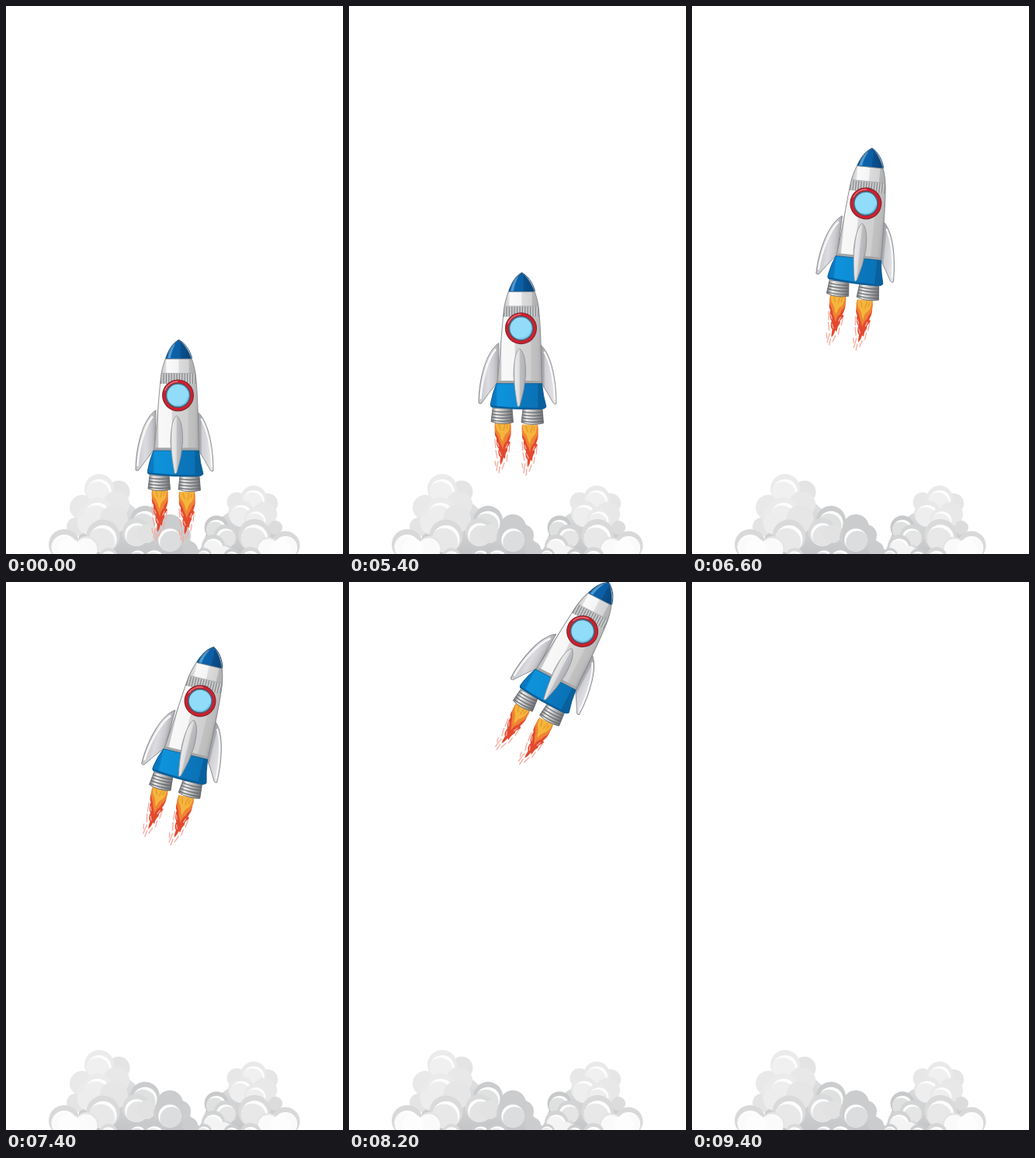
An HTML page with a canvas for the animation above (9600 ms loop, 434 px wide and 705 px high).

```html
<!DOCTYPE html>
<html lang="en">
<head>
<meta charset="utf-8">
<title>Rocket launch</title>
<style>
  html, body { margin: 0; width: 100%; height: 100%; overflow: hidden; background: #fff; }
  canvas { display: block; width: 434px; height: 705px; }
</style>
</head>
<body>
<canvas id="stage" width="434" height="705"></canvas>
<script>
const ctx = document.getElementById('stage').getContext('2d');
const LOOP = 9600, HOLD = 5000, STEP = 200;

// Window centre and tilt of the rocket: step, x, y, degrees
const PATH = [
  [0, 221.5, 501, 0], [1, 221.5, 476, 0], [4, 221.5, 384, 0],
  [5, 220, 358, 1.3], [9, 223.8, 254, 5.8], [13, 250, 153, 13.5],
  [17, 300.6, 63.5, 27.3], [18, 311.6, 33.4, 29], [19, 333.6, -3, 33],
  [20, 371, -44, 37], [21, 399.5, -75, 40], [22, 434.5, -114, 42]
];

function poseAt(step) {
  const i = Math.max(1, PATH.findIndex(p => p[0] >= step));
  const a = PATH[i - 1], b = PATH[i];
  const u = (step - a[0]) / (b[0] - a[0]);
  return [1, 2, 3].map(j => a[j] + (b[j] - a[j]) * u);
}

function shape(d, fill, line, width = 1) {
  const p = new Path2D(d);
  if (fill) { ctx.fillStyle = fill; ctx.fill(p); }
  if (line) { ctx.strokeStyle = line; ctx.lineWidth = width; ctx.stroke(p); }
}

function disc(x, y, r, fill, line, width = 1) {
  ctx.beginPath();
  ctx.arc(x, y, r, 0, Math.PI * 2);
  if (fill) { ctx.fillStyle = fill; ctx.fill(); }
  if (line) { ctx.strokeStyle = line; ctx.lineWidth = width; ctx.stroke(); }
}

function arc(x, y, r, from, to, color, width) {
  ctx.beginPath();
  ctx.arc(x, y, r, from, to);
  ctx.strokeStyle = color;
  ctx.lineWidth = width;
  ctx.stroke();
}

function across(x0, x1, ...stops) {
  const g = ctx.createLinearGradient(x0, 0, x1, 0);
  stops.forEach(([at, color]) => g.addColorStop(at, color));
  return g;
}

function clipped(d, draw) {
  ctx.save();
  ctx.clip(new Path2D(d));
  draw();
  ctx.restore();
}

// Smoke ball: rim on top, white crescent, body reaching the lower edge
function puff(x, y, r, rim, body, lean = 1) {
  disc(x, y, r, rim);
  ctx.save();
  ctx.beginPath();
  ctx.arc(x, y + r * 0.17, r * 0.82, 0, Math.PI * 2);
  ctx.clip();
  disc(x, y, r, '#fdfdfd');
  disc(x - lean * r * 0.13, y + r * 0.36, r * 0.84, body);
  ctx.restore();
}

function drawSmoke() {
  const shade = ctx.createLinearGradient(0, 630, 0, 705);
  shade.addColorStop(0, '#e3e4e4');
  shade.addColorStop(1, '#c3c5c7');
  shape('M100 650L150 632L168 648L196 664L222 672L244 694L252 705H90Z', shade);
  shape('M248 705L262 668L296 645L340 648L352 680L330 705Z', shade);

  // left bank
  disc(145, 625, 14.5, '#e4e4e4');
  disc(98, 645, 16, '#e9e9e9');
  disc(90, 670, 12, '#e4e4e4');
  puff(120, 621, 19, '#ebebeb', '#f0f0f0');
  disc(142, 641, 17, '#e8e8e8');
  disc(110, 659, 19, '#ebebeb');
  puff(118, 652, 20, '#ebebeb', '#eeeeee');
  disc(139, 660, 18, '#e6e6e6');
  disc(106, 666, 14, '#ededed');
  puff(179, 662, 19, '#cbccce', '#dfe0e0');
  puff(168, 677, 18, '#d9dadb', '#e4e4e4', -1);
  disc(181, 679, 12, '#e2e2e2');
  disc(203, 683, 13, '#cfd0d2');
  disc(224, 681, 14, '#cccdcf');
  disc(211, 671, 17, '#cbccce');
  puff(211, 684, 18, '#cbccce', '#dcddde', -1);
  disc(237, 699, 10, '#cbccce');
  puff(75, 693, 20, '#d9d9d9', '#fafafa');
  puff(125, 682, 21.5, '#dadada', '#e8e8e8');
  disc(104, 697, 15, '#e4e4e4');
  disc(103, 699, 14.5, '#fafafa');
  disc(82, 699, 14, '#fdfdfd');
  puff(132, 709, 12, '#dadada', '#f0f0f0');
  puff(170, 709, 13, '#c8c9cb', '#dadbdc');
  puff(191, 710, 15, '#c8c9cb', '#e7e7e7');

  // right bank
  disc(337, 640, 13, '#e5e5e5');
  disc(297, 638, 12.5, '#e7e7e7');
  puff(319, 634, 17, '#e9e9e9', '#f0f0f0');
  disc(333, 654, 16, '#e8e8e8');
  puff(303, 653, 17, '#e8e8e8', '#eeeeee');
  puff(322, 660, 15, '#e9e9e9', '#eeeeee');
  disc(347, 671, 9, '#dcdcdc');
  puff(271, 671, 15.5, '#c8c9cb', '#dfe0e0');
  puff(283, 682, 15, '#d3d4d5', '#e5e5e5', -1);
  puff(320, 681, 21, '#dadada', '#e8e8e8');
  puff(360, 694, 18.5, '#d9d9d9', '#fafafa', -1);
  disc(337, 697, 14, '#e4e4e4');
  disc(338, 699, 13.5, '#fafafa');
  disc(354, 699, 13, '#fdfdfd');
  puff(267, 695, 15, '#d2d3d4', '#f4f4f4');
  disc(283, 702, 9, '#d8d8d9');
  disc(280, 704, 9.5, '#f4f4f4');
  puff(255, 707, 10, '#cccdce', '#e8e8e8');
  puff(291, 709, 11, '#cccdce', '#e5e5e5');
  puff(315, 710, 14, '#d6d6d6', '#f0f0f0');
}

function drawFlame(x, y) {
  ctx.save();
  ctx.translate(x, y);
  ctx.lineCap = 'round';
  shape('M-10 22L-9 33M-9 36L-7 46M-6 50L-8 62M9 28L8 38M6 42L5 50M2 52L-1 60M-10 50L-9 56M-4 57L-5 65', null, '#f4a99c', 1.3);
  shape('M-10 9Q-11 17-8 20Q-9 30-5 34Q-7 41-3 45Q-4 51-3 55Q0 51 1 45L3 47Q3 40 6 36L6 32L10 26L8 24Q12 15 10 8Z', '#e3492f');
  shape('M-10 0Q-12 11-7 17Q-5 20-4 25Q-1 30 0 35Q1 27 5 24Q6 19 9 16Q12 8 10 0Z', '#ef8433');
  shape('M-9 0Q-10 8-5 13Q-3 16-2 21L0 25Q1 18 4 15Q9 12 9 0Z', '#f5b53c');
  shape('M-5 2L-3 9M3 2L1 10M6 3L5 8', null, '#e3952f', 1.2);
  shape('M-7 26L-5 31M-4 38L-2 43M6 28L4 33', null, '#f6bdb0', 1.2);
  ctx.restore();
}

function drawNozzle(x, y) {
  ctx.save();
  ctx.translate(x, y);
  const d = 'M-12 0H13L14.5 18Q0 22-14 17Z';
  shape(d, across(-14, 14, [0, '#77797c'], [0.25, '#eeeeee'], [0.55, '#b9babc'], [1, '#6f7073']));
  clipped(d, () => {
    for (let i = 1; i < 5; i++) {
      shape(`M-15 ${i * 4 - 1}Q0 ${i * 4 + 2} 15 ${i * 4 - 0.5}`, null, '#66686b', 1.2);
    }
  });
  shape(d, null, '#66686b', 0.8);
  ctx.restore();
}

function drawBody() {
  const hull = 'M222.5 429.5C211 437 203 456 200 473C197 496 195 535 190.5 573H248.5C247.5 535 247 497 244 473C241.5 456 234 437 222.5 429.5Z';
  clipped(hull, () => {
    ctx.fillStyle = across(191, 249, [0, '#b9babb'], [0.08, '#c9c9ca'], [0.1, '#f8f8f8'],
      [0.38, '#f6f6f6'], [0.4, '#d6d6d7'], [0.74, '#cfcfd0'], [0.76, '#c2c2c3'], [0.9, '#bcbcbd'], [1, '#a5a6a8']);
    ctx.fillRect(185, 425, 70, 150);

    // upper collar
    ctx.fillStyle = across(200, 244, [0, '#c9cacb'], [0.13, '#dedede'], [0.16, '#fafafa'],
      [0.5, '#f4f4f4'], [0.52, '#dcdcdd'], [0.8, '#d2d2d3'], [0.82, '#b5b6b8'], [1, '#adaeb0']);
    ctx.fillRect(195, 454, 55, 19);

    // vented band
    ctx.fillStyle = '#c9cacb';
    ctx.fillRect(185, 473, 70, 13);
    ctx.fillStyle = '#85878a';
    for (let x = 199; x < 248; x += 3.4) ctx.fillRect(x, 473, 1.2, 13);
    shape('M190 472.5H250', null, '#a5a6a8', 0.8);

    // nose cone
    ctx.fillStyle = across(205, 240, [0, '#0b5798'], [0.25, '#0c62a9'], [0.55, '#0c5ea5'], [0.57, '#0a4f8c'], [1, '#08437a']);
    ctx.fillRect(200, 425, 45, 29);
    shape('M216 436Q210 443 208 453H212Q213 444 218 435Z', '#4b9bd3');
    shape('M200 454H245', null, '#71808e', 0.8);
    shape('M192 570H250', null, '#a5a6a7', 3.5);
  });
  shape(hull, null, '#85878a', 0.9);
  shape('M206 453C209 443 214 434 222.5 429.5C231 434 237 443 239.5 453', null, '#0a4577', 0.9);
}

function drawSkirt() {
  const d = 'M190 572H248.5Q250 588 254 602Q252 605 246 605Q216 606 184 602.5Q181.500 601 182.500 597Q185 583 190 572Z';
  clipped(d, () => {
    ctx.fillStyle = across(182, 254, [0, '#0a75bb'], [0.1, '#0a7ac2'], [0.13, '#0e93db'],
      [0.48, '#0d8cd4'], [0.51, '#0b78be'], [0.84, '#0a73b8'], [0.86, '#08619d'], [1, '#08609b']);
    ctx.fillRect(180, 570, 78, 38);
    shape('M182 601Q216 605 254 603.500', null, '#08619d', 2);
  });
  shape(d, null, '#0d568c', 0.8);
}

function drawFins() {
  shape('M193 520C177 530 167 566 167 597Q169 599 171 597Q180 584 191.500 570Z',
    across(168, 193, [0, '#c6c7ca'], [0.45, '#dcdce0'], [0.75, '#c9c9ce'], [1, '#a9aaae']), '#85878b', 0.9);
  shape('M189 528C178 541 170.500 570 169.500 592', null, '#f8f8f8', 2.5);
  shape('M245 521C260 531 267 566 267 598Q265 599.500 263 597Q256 584 248 572Z',
    across(246, 267, [0, '#96979b'], [0.25, '#aeb0b4'], [0.3, '#cfcfd4'], [1, '#e9e9ec']), '#85878b', 0.9);
  shape('M251 531C259 543 264.500 570 265 593', null, '#fafafa', 1.8);
}

function drawKeel() {
  shape('M219.500 527C214 531 212 547 212 562Q214 586 217 601Q218.500 603 220 600Q226 580 227.500 562C228 545 226 531 219.500 527Z',
    across(212, 228, [0, '#b5b6b9'], [0.15, '#e9e9ea'], [0.45, '#dededf'], [0.52, '#bfc0c3'], [1, '#adaeb1']), '#8d8f92', 0.8);
}

function drawWindow() {
  disc(221.5, 501, 20.5, '#7d2530');
  disc(221.5, 501, 17.8, null, '#cf202e', 3.2);
  arc(221.5, 501, 18, 3.5, 4.7, '#e8737a', 1.3);
  disc(221.5, 501, 15, '#90dcf9', '#4a6f86', 1.6);
  arc(221.5, 501, 13.2, 0.1, 1.8, '#78c6e8', 1.5);
}

function drawRocket([x, y, tilt]) {
  ctx.save();
  ctx.translate(x, y);
  ctx.rotate(tilt * Math.PI / 180);
  ctx.translate(-221.5, -501);
  drawFlame(198, 622);
  drawFlame(233, 625);
  drawNozzle(197, 604);
  drawNozzle(236, 605);
  drawFins();
  drawBody();
  drawSkirt();
  drawKeel();
  drawWindow();
  ctx.restore();
}

function render(now) {
  const t = now % LOOP;
  const step = t < HOLD ? 0 : Math.floor((t - HOLD) / STEP) + 1;
  ctx.fillStyle = '#fff';
  ctx.fillRect(0, 0, 434, 705);
  drawSmoke();
  if (step <= 22) drawRocket(poseAt(step));
}

let start;
function tick(now) {
  start ??= now;
  render(now - start);
  requestAnimationFrame(tick);
}
requestAnimationFrame(tick);
</script>
</body>
</html>
```
